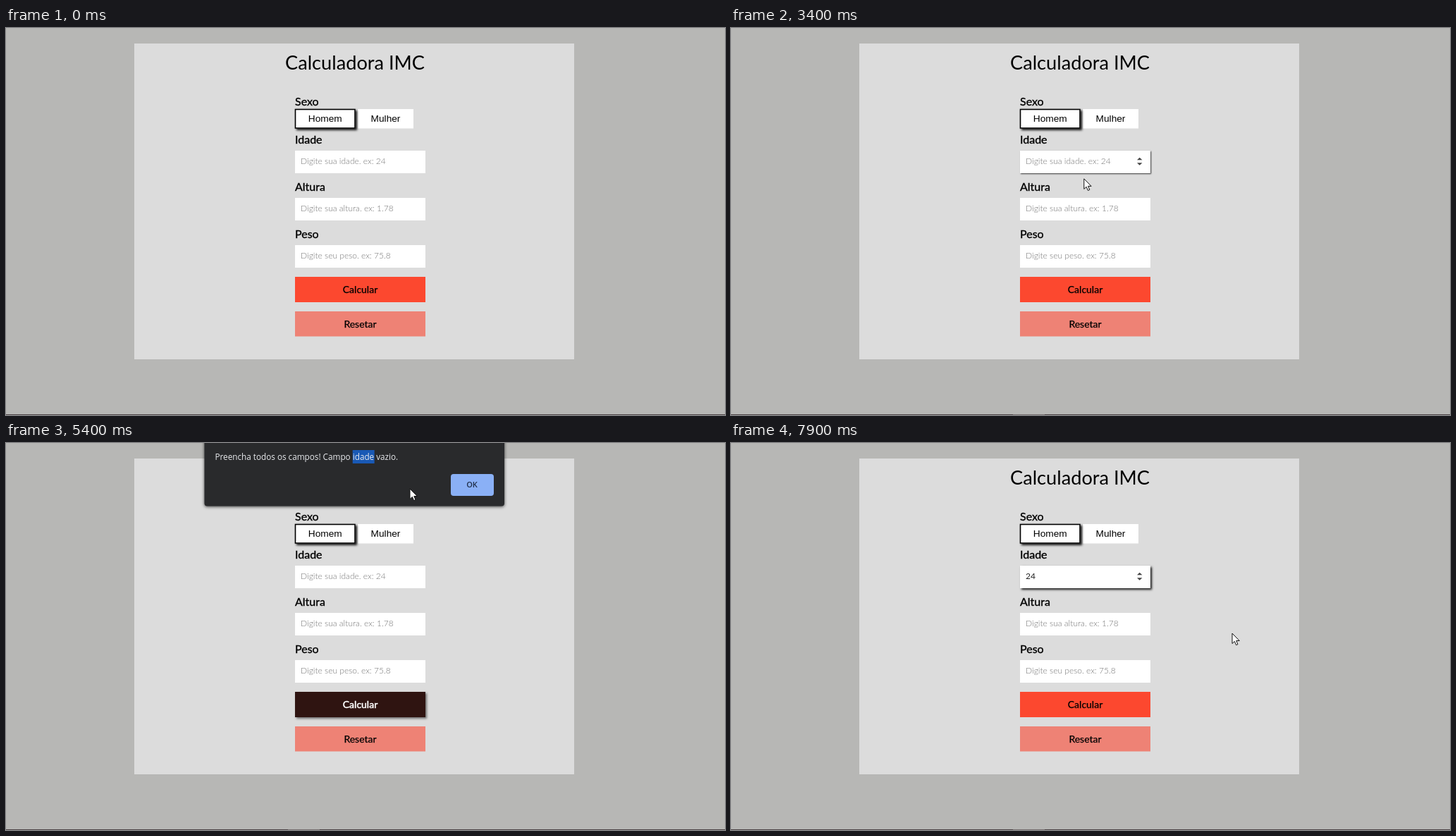
Animation, 1020 px wide and 549 px high, one loop 8 s. Source, as an HTML page with a canvas:

```html
<!DOCTYPE html>
<html lang="pt">
<head>
<meta charset="utf-8">
<title>Calculadora IMC</title>
<style>
html, body { margin: 0; width: 100%; height: 100%; overflow: hidden; background: #b7b7b5; }
canvas { display: block; }
</style>
</head>
<body>
<canvas id="stage" width="1020" height="549"></canvas>
<script>
const ctx = document.getElementById('stage').getContext('2d');
const LOOP = 8000;

const HAND = new Path2D('M-2 12V1.5Q-2 0-.5 0T1 1.5V7Q1 6 2.3 6T3.7 7.5Q4 6.6 5.2 6.8T6.3 8.3Q6.5 7.6 7.6 8T8.5 9.8V14Q8.5 16 7 18V20H-.5V18.5L-6 12.5Q-6.8 11-5.5 10.6T-3.2 11.5Z');
const ARROW = new Path2D('M0 0V14.5L3.4 11.4L5.6 16.6L8 15.6L5.8 10.5H10.3Z');

const BOXES = {
  homem: [410, 115, 85.5, 27.5],
  mulher: [499, 115, 79, 27.5],
  idade: [410, 174, 185, 32],
  altura: [410, 241, 185, 32],
  peso: [410, 308, 185, 32],
  calcular: [410, 353, 185, 36],
  resetar: [410, 402, 185, 35.5],
};

// Pointer stops: time, x, y
const PATH = [
  [200, 118, 307], [600, 330, 140], [750, 430, 32], [950, 535, 125], [1100, 535, 126],
  [1300, 489, 139], [2100, 489, 139], [2400, 496, 184], [2800, 496, 189], [3250, 496, 189],
  [3900, 531, 371], [4100, 531, 371], [4250, 531, 358], [4350, 531, 358], [4900, 303, 20],
  [5000, 303, 20], [5200, 507, 20], [5250, 507, 20], [5400, 573, 65], [5750, 660, 60],
  [6000, 660, 60], [6400, 496, 198], [6650, 496, 198], [7100, 502, 176], [7600, 502, 176],
  [7850, 711, 270], [8000, 711, 270],
];

const clamp = u => Math.min(1, Math.max(0, u));
const between = (t, a, b) => t >= a && t < b;
const mix = (a, b, u) => a + (b - a) * u;
const ramp = (t, a, b) => 1 - (1 - clamp((t - a) / (b - a))) ** 2;
const blend = (c, d, u) => `rgb(${c.map((v, i) => Math.round(mix(v, d[i], u)))})`;

function rect(box, fill) {
  ctx.fillStyle = fill;
  ctx.fillRect(...box);
}

function raised(box, fill, p, strength) {
  ctx.save();
  if (p > 0) {
    ctx.shadowColor = `rgba(0,0,0,${strength * Math.min(1, p * 1.5)})`;
    ctx.shadowOffsetX = ctx.shadowOffsetY = 2 * p;
    ctx.shadowBlur = 3 * p;
  }
  rect(box, fill);
  ctx.restore();
}

function text(str, x, y, font, fill, weight = 0, align = 'left') {
  ctx.font = font;
  ctx.textAlign = align;
  ctx.fillStyle = ctx.strokeStyle = fill;
  ctx.fillText(str, x, y);
  if (weight) {
    ctx.lineWidth = weight;
    ctx.strokeText(str, x, y);
  }
}

function choice(box, label, p) {
  const [x, y, w, h] = box;
  raised(box, '#fff', p, 0.9);
  ctx.strokeStyle = `rgba(0,0,0,${p})`;
  ctx.lineWidth = 1.6;
  ctx.strokeRect(x + 0.5, y + 0.5, w - 1, h - 1);
  text(label, x + w / 2, 133, '13.7px "Liberation Sans", Arial, sans-serif', '#000', 0, 'center');
}

function field(box, label, value, typed, hover) {
  text(label, 410, box[1] - 10, '16px Lato, sans-serif', '#000', 0.35);
  raised(box, '#fff', hover, 0.9);
  text(value, 418, box[1] + 19, `${typed ? 400 : 300} 12px Lato, sans-serif`, typed ? '#222' : '#757575');
}

function action(box, label, fill, color, p) {
  raised(box, fill, p, 0.5);
  text(label, 502.5, box[1] + 23, '14px Lato, sans-serif', color, 0.25 + 0.25 * p, 'center');
}

function spinner() {
  for (const dir of [-1, 1]) {
    const y = 189.3 + dir * 2;
    ctx.beginPath();
    ctx.moveTo(576, y);
    ctx.lineTo(583.4, y);
    ctx.lineTo(579.7, y + dir * 3.5);
    ctx.fillStyle = '#444';
    ctx.fill();
  }
}

function dialog(t) {
  const opacity = clamp((t - 4020) / 120) * clamp((6060 - t) / 80);
  if (!opacity) return;
  ctx.save();
  ctx.globalAlpha = opacity;
  ctx.save();
  ctx.shadowColor = 'rgba(0,0,0,.7)';
  ctx.shadowBlur = 4;
  ctx.shadowOffsetY = 1;
  ctx.beginPath();
  ctx.roundRect(281.5, -10, 425.5, 99.5, 4);
  ctx.fillStyle = '#292a2c';
  ctx.fill();
  ctx.restore();

  const font = '11.72px "Open Sans", "Noto Sans", sans-serif';
  const lead = 'Preencha todos os campos! Campo ';
  if (t >= 5230) {
    ctx.font = font;
    const start = 296.5 + ctx.measureText(lead).width;
    rect([start, 10, ctx.measureText('idade').width + 0.5, 19], '#1959b5');
  }
  text(lead + 'idade vazio.', 296.5, 24, font, '#e8eaed');

  ctx.beginPath();
  ctx.roundRect(631, 44, 61, 31, 4);
  ctx.fillStyle = t > 5650 ? '#93b9f8' : '#8ab0f6';
  ctx.fill();
  text('OK', 661, 63, '600 11px "Open Sans", "Noto Sans", sans-serif', '#202f4a', 0, 'center');
  ctx.restore();
}

function pointer(t) {
  if (t < PATH[0][0] || between(t, 7400, 7640)) return;
  const i = PATH.findIndex(stop => stop[0] > t);
  const [a, b] = [PATH[i - 1], PATH[i]];
  const u = clamp((t - a[0]) / (b[0] - a[0]));
  const s = u * u * (3 - 2 * u);
  const x = mix(a[1], b[1], s), y = mix(a[2], b[2], s);
  const modal = between(t, 4100, 6040);
  const over = ([bx, by, w, h]) => x >= bx && x <= bx + w && y >= by && y <= by + h;

  ctx.save();
  ctx.translate(x, y);
  ctx.lineJoin = 'round';
  ctx.lineWidth = 1;
  ctx.strokeStyle = '#111';
  ctx.fillStyle = '#fff';
  if (modal && y < 30 && x > 296 && x < 557) {
    ctx.strokeStyle = '#ddd';
    ctx.stroke(new Path2D('M-3-7H-1L0-6L1-7H3M0-6V6M-3 7H-1L0 6L1 7H3'));
  } else {
    const shape = !modal && Object.values(BOXES).some(over) ? HAND : ARROW;
    ctx.fill(shape);
    ctx.stroke(shape);
  }
  ctx.restore();
}

function draw(t) {
  rect([0, 0, 1020, 549], '#b7b7b5');
  rect([182, 22, 624, 448], '#dcdcdc');
  rect([0, 548, 1020, 1], '#4b4345');
  if (t >= 1100) rect([400, 548, 45, 1], '#777071');

  text('Calculadora IMC', 396, 58.5, '27.2px Lato, sans-serif', '#000');
  text('Sexo', 410, 110, '16px Lato, sans-serif', '#000', 0.35);

  const back = ramp(t, 1250, 2000);
  choice(BOXES.mulher, 'Mulher', ramp(t, 850, 1150) * (1 - back));
  choice(BOXES.homem, 'Homem', 1 - ramp(t, 950, 1200) * (1 - back));

  const typed = t >= 7400;
  const hover = ramp(t, 2350, 2850) - ramp(t, 3300, 3700) + ramp(t, 6400, 6900);
  field(BOXES.idade, 'Idade', typed ? '24' : 'Digite sua idade. ex: 24', typed, hover);
  field(BOXES.altura, 'Altura', 'Digite sua altura. ex: 1.78');
  field(BOXES.peso, 'Peso', 'Digite seu peso. ex: 75.8');
  if (between(t, 2300, 4100) || t >= 6000) spinner();

  const focused = between(t, 2500, 4100) || between(t, 6000, 7400);
  if (focused && t % 1000 >= (t < 5000 ? 500 : 0) && (t < 5000 || t % 1000 < 500)) {
    rect([418, 182, 1, 15], '#000');
  }

  const press = ramp(t, 3600, 4100) - ramp(t, 6000, 6500);
  action(BOXES.calcular, 'Calcular', blend([252, 72, 47], [47, 20, 17], press),
    blend([0, 0, 0], [255, 255, 255], press), press);
  action(BOXES.resetar, 'Resetar', '#ee8275', '#000', 0);

  dialog(t);
  pointer(t);
}

function tick() {
  draw(performance.now() % LOOP);
  requestAnimationFrame(tick);
}
tick();
</script>
</body>
</html>
```
